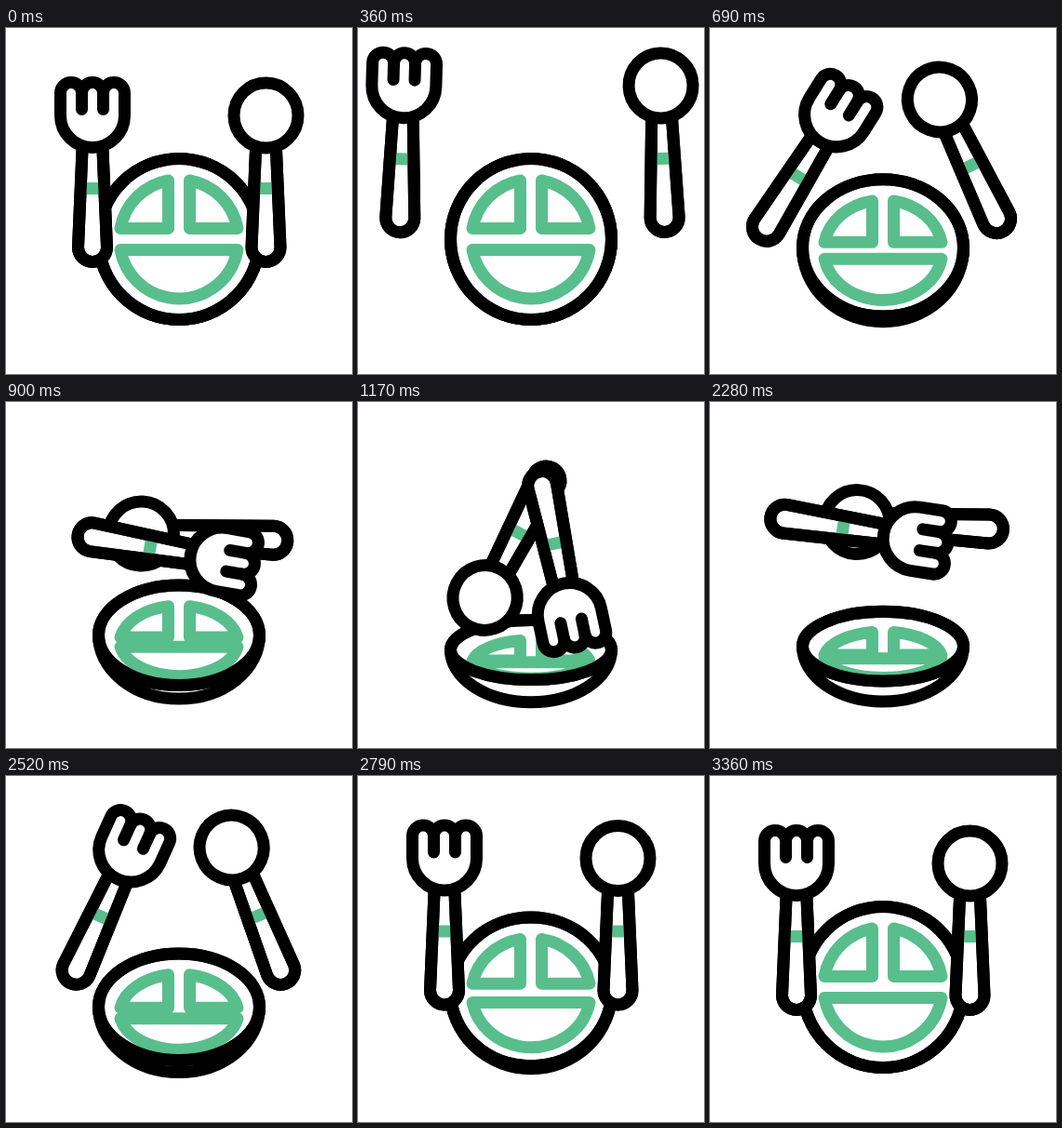
Write an HTML page with a canvas that moves like this. It is 372 by 372 pixels and loops after 3600 ms.

```html
<!DOCTYPE html>
<html lang="en">
<head>
<meta charset="utf-8">
<title>Salad bowl</title>
<style>
  html, body { margin: 0; width: 100%; height: 100%; overflow: hidden; background: #fff; }
  canvas { display: block; width: 372px; height: 372px; }
</style>
</head>
<body>
<canvas id="stage" width="372" height="372"></canvas>
<script>
const ctx = document.getElementById('stage').getContext('2d');
const LOOP = 3600, STEP = 30, LAST = 3360;
const GREEN = '#58be8c', BLACK = '#000', LINE = 13, MID = 186;

// Keys: time, then values
const TILT = [[0, 0], [420, 0], [690, .22], [1170, .93], [1500, 1], [1710, 1],
  [2280, .84], [2790, .115], [3330, 0]];
// time, centre x, centre y, degrees
const FORK = [[0, 93, 165, 0], [400, 46, 132, 2], [570, 64, 131, 15], [690, 98.5, 153.5, 32],
  [1170, 213, 159.5, 168], [1710, 199, 135, 158.5], [2280, 150.5, 136.5, 98.7],
  [2640, 93, 150, 2], [2790, 93, 159.5, 0], [3330, 93, 165, 0]];
const SPOON = [[0, 279.5, 165, 0], [400, 329, 132, -2], [570, 314, 132, -13], [690, 277.5, 141, -25.5],
  [1170, 169.5, 147.5, -152.4], [1710, 188.3, 128.8, -141.4], [2280, 229, 132.8, -87],
  [2640, 279.5, 150, -2], [2790, 279.5, 159.5, 0], [3330, 279.5, 165, 0]];

const clamp = v => Math.max(0, Math.min(1, v));
const lerp = (a, b, u) => a + (b - a) * u;

// Smooth interpolation that never overshoots its keys
function sample(keys, t, col = 1) {
  const last = keys.length - 1;
  if (t >= keys[last][0]) return keys[last][col];
  const i = keys.findIndex((k, n) => n < last && t < keys[n + 1][0]);
  const secant = n => (keys[n + 1][col] - keys[n][col]) / (keys[n + 1][0] - keys[n][0]);
  const slope = n => {
    if (n === 0 || n === last) return 0;
    const a = secant(n - 1), b = secant(n);
    return a * b <= 0 ? 0 : 2 * a * b / (a + b);
  };
  const h = keys[i + 1][0] - keys[i][0], u = (t - keys[i][0]) / h, v = 1 - u;
  return keys[i][col] * (1 + 2 * u) * v * v + slope(i) * h * u * v * v
    + keys[i + 1][col] * u * u * (3 - 2 * u) - slope(i + 1) * h * u * u * v;
}

function shape(build, stroke, fill) {
  ctx.beginPath();
  build();
  if (fill) { ctx.fillStyle = fill; ctx.fill(); }
  ctx.strokeStyle = stroke;
  ctx.stroke();
}

function food(k) {
  const cy = lerp(227, 282.75, k), gap = 11.5 * (1 - k);
  const upper = lerp(164, 263.5, k), lower = lerp(291, 297.5, k);
  const turn = Math.asin(11.5 / 64);
  const quarter = side => {
    const height = (cy - gap - upper) / (Math.cos(turn) - Math.sin(turn));
    const base = cy - gap + height * Math.sin(turn);
    const start = side < 0 ? Math.PI + turn : -turn;
    const end = -Math.PI / 2 + side * turn;
    ctx.ellipse(MID, base, 64, height, 0, start, end, side > 0);
    ctx.lineTo(MID + side * 11.5, cy - gap);
    ctx.closePath();
  };
  shape(() => quarter(-1), GREEN);
  shape(() => quarter(1), GREEN);
  shape(() => {
    const height = (lower - cy - gap) / (1 - Math.sin(turn));
    ctx.ellipse(MID, lower - height, 64, height, 0, turn, Math.PI - turn);
    ctx.closePath();
  }, GREEN);
}

function bowl(k) {
  const cy = lerp(227, 269.5, k), ry = lerp(86.5, 28, k), bottom = lerp(313.5, 323.5, k);
  const rim = () => ctx.ellipse(MID, cy, 86.5, ry, 0, 0, Math.PI * 2);
  shape(() => ctx.ellipse(MID, cy, 86.5, bottom - cy, 0, 0, Math.PI), BLACK, '#fff');
  shape(rim, BLACK, '#fff');
  ctx.save();
  ctx.beginPath();
  rim();
  ctx.clip();
  food(k);
  ctx.restore();
  shape(rim, BLACK);
}

function sparks(t) {
  const u = (t - 1560) / 300;
  const outer = 30 + 17 * clamp(u / .5), inner = 30 + 17 * clamp((u - .28) / .5);
  if (outer - inner < .1) return;
  ctx.lineWidth = 12;
  for (let n = 0; n < 3; n++) {
    const a = Math.PI + n * Math.PI / 4, c = Math.cos(a), s = Math.sin(a);
    shape(() => {
      ctx.moveTo(147.5 + c * inner, 128 + s * inner);
      ctx.lineTo(147.5 + c * outer, 128 + s * outer);
    }, GREEN);
  }
  ctx.lineWidth = LINE;
}

function handle() {
  const outline = () => {
    ctx.moveTo(11, -34);
    ctx.lineTo(15.5, 71);
    ctx.arc(0, 71, 15.5, 0, Math.PI);
    ctx.lineTo(-11, -34);
  };
  shape(outline, BLACK, '#fff');
  ctx.fillStyle = GREEN;
  ctx.fillRect(-12.5, 1, 25, 13);
  shape(outline, BLACK);
}

function forkHead() {
  shape(() => {
    ctx.moveTo(-34.5, -95);
    for (const x of [-23, 0, 23]) ctx.arc(x, -95, 11.5, Math.PI, 0);
    ctx.lineTo(34.5, -71);
    ctx.arc(0, -71, 34.5, 0, Math.PI);
    ctx.closePath();
  }, BLACK, '#fff');
  for (const x of [-11.5, 11.5]) {
    shape(() => { ctx.moveTo(x, -95); ctx.lineTo(x, -77.5); }, BLACK);
  }
}

function spoonHead() {
  shape(() => ctx.ellipse(0, -71, 34.5, 35, 0, 0, Math.PI * 2), BLACK, '#fff');
}

function utensil(keys, t, head) {
  ctx.save();
  ctx.translate(sample(keys, t, 1), sample(keys, t, 2));
  ctx.rotate(sample(keys, t, 3) * Math.PI / 180);
  handle();
  head();
  ctx.restore();
}

function draw(now) {
  const t = Math.min(LAST, Math.floor((now % LOOP) / STEP) * STEP);
  ctx.fillStyle = '#fff';
  ctx.fillRect(0, 0, 372, 372);
  ctx.lineWidth = LINE;
  ctx.lineJoin = ctx.lineCap = 'round';
  bowl(sample(TILT, t));
  sparks(t);
  utensil(SPOON, t, spoonHead);
  utensil(FORK, t, forkHead);
}

const begin = performance.now();
function tick() {
  draw(performance.now() - begin);
  requestAnimationFrame(tick);
}
tick();
</script>
</body>
</html>
```
